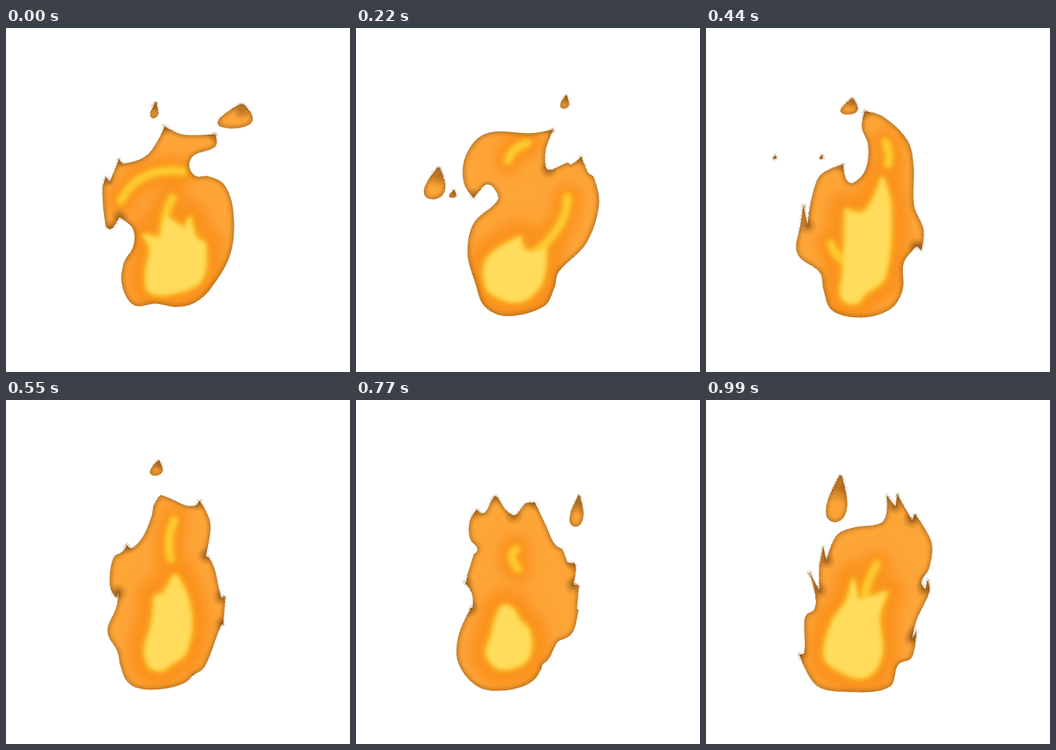
An HTML page with a canvas that plays this animation: 748 px wide and 748 px high, repeating every 1100 ms.

```html
<!DOCTYPE html>
<html lang="en">
<head>
<meta charset="utf-8">
<title>Flame</title>
<style>
html, body { margin: 0; width: 100%; height: 100%; overflow: hidden; background: #fff; }
canvas { display: block; width: 748px; height: 748px; }
</style>
</head>
<body>
<canvas id="stage" width="748" height="748"></canvas>
<script>
const SIZE = 748, STEP = 110;
const browns = ["#8a5a1c", "#6f4716", "#a96c22"];

function random(seed) {
  return () => {
    seed = (seed * 1664525 + 1013904223) >>> 0;
    return seed / 4294967296;
  };
}

function group(text, n) {
  const v = text.split(" ").map(Number), out = [];
  for (let i = 0; i < v.length; i += n) out.push(v.slice(i, i + n));
  return out;
}

// Cosine of the turn a -> p -> b.
function turn(a, p, b) {
  const ux = p[0] - a[0], uy = p[1] - a[1], vx = b[0] - p[0], vy = b[1] - p[1];
  return (ux * vx + uy * vy) / (Math.hypot(ux, uy) * Math.hypot(vx, vy) || 1);
}

// Unit tangent at each point; sharp turns stay corners.
function tangents(pts) {
  return pts.map((p, i) => {
    const a = pts.at(i - 1), b = pts[(i + 1) % pts.length];
    if (turn(a, p, b) < 0.2) return [0, 0];
    const d = Math.hypot(b[0] - a[0], b[1] - a[1]);
    return [(b[0] - a[0]) / d, (b[1] - a[1]) / d];
  });
}

// Closed smooth curve as points about one pixel apart.
function outline(text) {
  const pts = group(text, 2), tan = tangents(pts), out = [];
  pts.forEach((p, i) => {
    const j = (i + 1) % pts.length, q = pts[j];
    const len = Math.hypot(q[0] - p[0], q[1] - p[1]), h = len / 3, n = Math.ceil(len);
    for (let k = 0; k < n; k++) {
      const t = k / n, s = 1 - t;
      out.push([0, 1].map(c =>
        s * s * s * p[c] + 3 * s * s * t * (p[c] + tan[i][c] * h) +
        3 * s * t * t * (q[c] - tan[j][c] * h) + t * t * t * q[c]));
    }
  });
  return out;
}

// Drop with a pointed top leaning right.
function drop([x, y, rx, ry]) {
  const n = Math.ceil(4 * (rx + ry)), out = [];
  for (let k = 0; k < n; k++) {
    const a = k / n * 2 * Math.PI, u = (1 - Math.cos(a)) / 2;
    out.push([x + rx * (Math.sin(a) * (0.35 + 0.9 * u) + 0.5 * (1 - u)), y - ry * Math.cos(a)]);
  }
  return out;
}

const mid = (a, b) => a.map((v, i) => (v + b[i]) / 2);

// Resample both sides of a line, from its start to its lowest point and back.
function resample(line, n = 600) {
  let low = 0;
  line.forEach((p, i) => { if (p[1] > line[low][1]) low = i; });
  const pick = (from, to, k) => line[Math.round(from + (to - from) * k / n) % line.length];
  return Array.from({ length: 2 * n }, (_, k) =>
    k < n ? pick(0, low, k) : pick(low, line.length, k - n));
}

function blendLine(a, b) {
  const q = resample(b);
  return resample(a).map((p, i) => mid(p, q[i]));
}

function between(a, b) {
  const sparks = [];
  for (const s of b.sparks) {
    const near = a.sparks.find(r => Math.hypot(r[0] - s[0], r[1] - s[1]) < 150);
    if (near) sparks.push(mid(near, s));
  }
  return {
    body: blendLine(a.body, b.body),
    core: blendLine(a.core, b.core),
    wisps: [mid(a.wisps[0], b.wisps[0])],
    sparks
  };
}

// Outlines start at the crest; wisps are start, control, end; sparks are centre and radii.
function pose(body, core, wisps, sparks) {
  return { body: outline(body), core: outline(core), wisps: group(wisps, 6), sparks: group(sparks, 4) };
}

const hook = pose(
  "345 214 385 232 455 231 455 257 408 277 398 300 412 322 441 323 475 342 494 400 488 490 445 566 410 597 372 606 325 599 278 602 253 560 256 512 277 475 276 436 246 411 230 436 218 432 210 350 217 324 226 335 246 285 256 295 305 278 333 240",
  "305 535 314 480 300 450 335 458 347 410 387 437 400 412 414 458 432 470 425 545 380 572 315 574",
  "250 375 290 300 385 312 345 435 345 400 362 370",
  "492 192 41 26 321 179 9 17");

const curl = pose(
  "429 221 413 262 412 300 422 309 460 293 468 297 490 280 505 315 517 325 528 385 500 468 440 531 431 565 408 605 328 626 280 605 260 555 243 490 256 425 308 375 303 352 285 340 265 358 256 369 236 340 235 290 262 243 300 226 380 229",
  "280 545 285 505 318 475 357 455 370 485 412 480 402 555 355 594 295 577",
  "330 288 340 260 372 250 459 368 462 425 395 485",
  "452 161 10 14 167 338 25 34 209 361 8 8");

const spread = pose(
  "384 162 376 210 392 237 398 214 415 225 421 270 450 297 455 311 495 302 525 310 530 328 541 333 527 380 526 415 498 470 494 515 473 549 447 533 420 538 411 565 428 601 395 615 320 634 260 597 253 565 224 530 221 470 238 410 250 430 271 380 274 416 314 378 301 332 324 322 292 293 300 245 340 195",
  "282 500 312 440 318 422 350 435 372 440 358 500 404 575 370 603 320 590",
  "428 345 430 410 345 455 470 395 475 440 458 455 335 270 345 250 346 238",
  "161 296 19 29 201 348 4 4");

const tall = pose(
  "345 181 385 193 438 245 451 300 452 385 473 440 468 483 458 474 430 510 427 570 402 610 340 629 275 614 256 570 248 532 199 490 206 425 212 385 221 430 245 325 298 297 305 330 320 337 347 308 353 255 339 215",
  "298 540 303 445 304 395 345 400 383 325 400 385 388 540 345 578 325 598 295 585",
  "390 248 402 275 396 296 272 470 280 495 300 505",
  "308 171 20 17 149 281 4 4 250 281 4 4");

const bend = pose(
  "330 234 385 261 416 250 416 212 441 270 418 347 432 344 460 375 471 440 479 418 476 500 486 493 475 548 430 601 397 606 402 593 378 617 300 630 262 620 237 565 242 517 277 470 262 428 226 408 220 362 230 358 226 335 245 290 285 250",
  "308 540 335 505 345 430 402 495 392 555 340 575",
  "342 275 295 320 320 395 328 290 335 325 312 350",
  "341 125 9 15 469 260 18 39");

const horned = pose(
  "277 184 285 225 302 241 311 210 347 236 356 225 385 270 457 291 466 305 464 340 488 315 467 385 490 365 472 460 455 478 418 478 411 540 385 612 310 634 235 608 202 555 220 437 232 450 242 420 235 382 253 380 300 295 268 287 247 245 258 213 264 238 274 243",
  "260 555 262 495 285 468 325 472 335 500 352 515 350 572 320 590 275 588",
  "355 375 360 355 385 338 353 425 360 475 325 490",
  "485 223 14 28");

const blaze = pose(
  "393 208 412 232 416 205 448 262 454 248 490 310 485 365 468 395 477 412 482 392 486 415 457 480 448 520 457 505 447 560 418 575 398 624 305 634 240 620 203 553 214 550 214 485 218 468 236 455 238 425 225 375 247 415 247 360 255 320 262 350 284 295 320 278 380 268 393 245",
  "258 555 277 480 305 440 320 390 330 435 352 430 393 418 376 470 380 555 345 602 285 585",
  "345 430 350 390 372 357",
  "280 215 25 50");

const poses = [
  hook, between(hook, curl), curl, spread, tall,
  between(tall, bend), bend, between(bend, horned), horned, blaze
];

function toPath(lines) {
  const path = new Path2D();
  for (const line of lines) {
    line.forEach(([x, y], i) => i ? path.lineTo(x, y) : path.moveTo(x, y));
    path.closePath();
  }
  return path;
}

function soft(c, path, color, blur, width, filled) {
  c.filter = `blur(${blur}px)`;
  c.fillStyle = c.strokeStyle = color;
  c.lineWidth = width;
  if (filled) c.fill(path);
  c.stroke(path);
  c.filter = "none";
}

// Tips and notches of the upper edge are charred.
function charred({ body, sparks }) {
  const spots = sparks.map(([x, y, rx, ry]) => [x + rx / 2, y - ry / 2, 6 + ry * 0.6]);
  const gap = 12, n = body.length;
  body.forEach((p, i) => {
    if (p[1] > 570 || turn(body.at(i - gap), p, body[(i + gap) % n]) > 0.45) return;
    if (spots.every(s => Math.hypot(s[0] - p[0], s[1] - p[1]) > 13)) spots.push([...p, 21]);
  });
  return spots;
}

function grain(c, lines, spots, rnd) {
  for (const line of lines) {
    for (const [x, y] of line) {
      let burn = 0;
      for (const [sx, sy, r] of spots) burn = Math.max(burn, 1 - Math.hypot(x - sx, y - sy) / (r * 1.2));
      const count = burn > 0.1 ? 2 : 1, reach = 1.6 + burn * 5;
      for (let k = 0; k < count; k++) {
        const dx = (rnd() + rnd() - 1) * reach, dy = (rnd() + rnd() - 1) * reach;
        c.fillStyle = browns[Math.floor(rnd() * browns.length)];
        c.globalAlpha = 0.45 + rnd() * 0.4;
        c.fillRect(x + dx - 0.5, y + dy - 0.5, 1, 1);
      }
    }
  }
  c.globalAlpha = 1;
}

function paint(p, index) {
  const canvas = document.createElement("canvas");
  canvas.width = canvas.height = SIZE;
  const c = canvas.getContext("2d");
  c.lineJoin = c.lineCap = "round";
  const edges = [p.body, ...p.sparks.map(drop)];
  const flame = toPath(edges), core = toPath([p.core]), wisps = new Path2D();
  for (const [x, y, cx, cy, ex, ey] of p.wisps) {
    wisps.moveTo(x, y);
    wisps.quadraticCurveTo(cx, cy, ex, ey);
  }
  const spots = charred(p);

  c.fillStyle = "#fea538";
  c.fill(flame);
  c.save();
  c.clip(flame);
  soft(c, core, "#fa921e", 13, 78, true);
  soft(c, wisps, "#fa921e", 12, 62);
  soft(c, wisps, "rgba(253,178,30,.8)", 6, 26);
  soft(c, core, "#fdb924", 7, 12, true);
  soft(c, wisps, "#fecb32", 4, 14);
  soft(c, core, "#ffdc5c", 3.5, 2, true);
  soft(c, flame, "rgba(125,74,16,.5)", 4, 8);
  for (const [x, y, r] of spots) {
    const g = c.createRadialGradient(x, y, 0, x, y, r);
    g.addColorStop(0, "rgba(135,80,20,.6)");
    g.addColorStop(0.5, "rgba(145,86,22,.32)");
    g.addColorStop(1, "rgba(160,95,25,0)");
    c.fillStyle = g;
    c.fillRect(x - r, y - r, 2 * r, 2 * r);
  }
  c.restore();
  grain(c, edges, spots, random(index * 97 + 11));
  return canvas;
}

const pictures = poses.map(paint);
const stage = document.getElementById("stage").getContext("2d");
const start = performance.now();
let shown = -1;

function draw(now) {
  const i = Math.floor(Math.max(0, now - start) / STEP) % pictures.length;
  if (i !== shown) {
    stage.fillStyle = "#fff";
    stage.fillRect(0, 0, SIZE, SIZE);
    stage.drawImage(pictures[i], 0, 0);
    shown = i;
  }
  requestAnimationFrame(draw);
}
draw(start);
</script>
</body>
</html>
```
